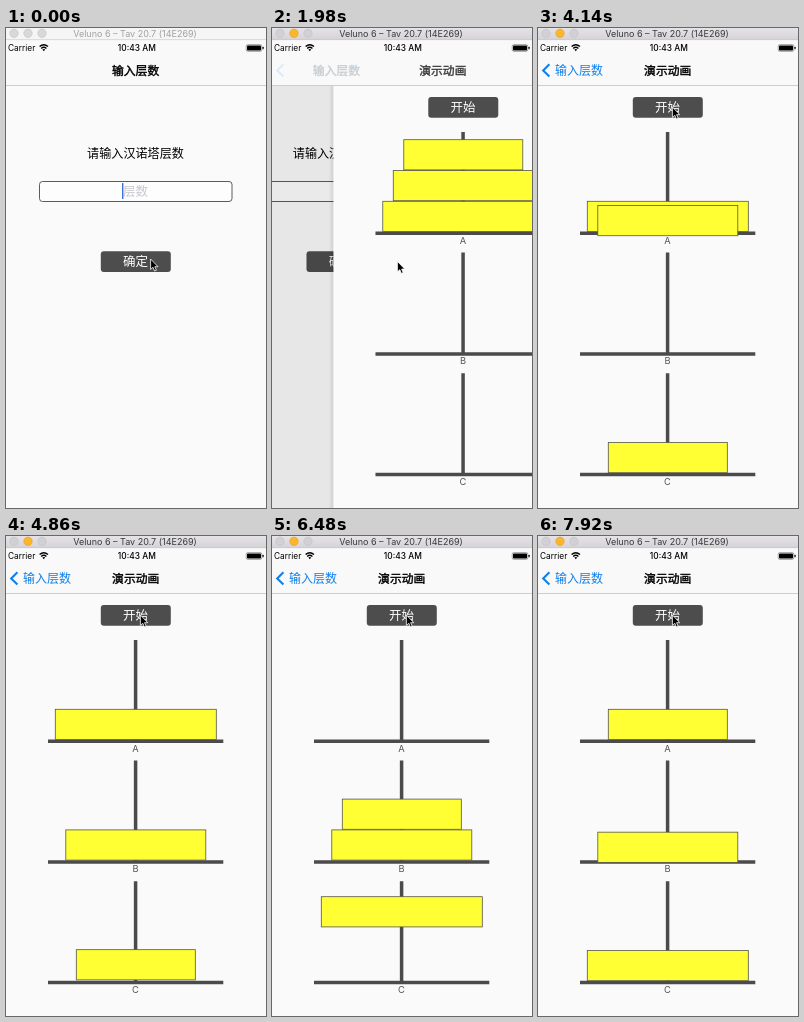
Animation, 260 px wide and 480 px high, one loop 8 s. Source, as an HTML page:

```html
<!DOCTYPE html>
<html lang="zh">
<head>
<meta charset="utf-8">
<style>
html, body { margin: 0; width: 100%; height: 100%; overflow: hidden; background: #fafafa; }
svg { display: block; width: 100vw; height: 100vh; }
text { font-family: Inter, "Noto Sans CJK SC", "Noto Sans CJK", sans-serif; }
.mid { text-anchor: middle; }
.button rect { fill: #4d4d4d; }
.button text { fill: #fff; font-size: 12.5px; }
.nav { font-size: 11.8px; stroke: #000; stroke-width: .4; }
.back { font-size: 12px; fill: #0f7fea; }
.peg { stroke: #4b4b4b; stroke-width: 3.5; fill: none; }
.label { font-size: 9.3px; fill: #555; }
.disk { fill: #ffff33; stroke: #55554c; stroke-width: .8; }
</style>
</head>
<body>
<svg viewBox="0 0 260 480">
  <defs>
    <linearGradient id="edge">
      <stop offset="0" stop-opacity="0"/>
      <stop offset="1" stop-opacity=".1"/>
    </linearGradient>
    <linearGradient id="chrome" x2="0" y2="1">
      <stop offset="0" stop-color="#e6e3e8"/>
      <stop offset="1" stop-color="#d5d2d8"/>
    </linearGradient>
  </defs>

  <g id="form">
    <rect width="260" height="480" fill="#fafafa"/>
    <text class="mid" x="129.5" y="129.5" font-size="12.1">请输入汉诺塔层数</text>
    <rect x="33.5" y="153.5" width="192.5" height="20" rx="3" fill="#fdfdfd" stroke="#4a4a4a" stroke-width=".9"/>
    <text id="hint" class="mid" x="129.5" y="167.8" font-size="12.5" fill="#c7c7cd">层数</text>
    <text id="typed" class="mid" x="129.5" y="167.8" font-size="12.5">3</text>
    <rect id="caret" y="155" width="1.4" height="16" fill="#3f6fd8"/>
    <g class="button">
      <rect x="94.8" y="223.2" width="70" height="20.8" rx="3"/>
      <text class="mid" x="129.5" y="238.3">确定</text>
    </g>
  </g>
  <rect id="dim" width="260" height="480"/>

  <g id="demo">
    <rect x="-5" width="5" height="480" fill="url(#edge)"/>
    <rect width="260" height="480" fill="#fafafa"/>
    <g class="button">
      <rect x="94.8" y="69" width="70" height="20.8" rx="3"/>
      <text class="mid" x="129.5" y="84">开始</text>
    </g>
    <g id="pegs"></g>
    <g id="disks"></g>
  </g>

  <rect y="12" width="260" height="46" fill="#f9f9f9"/>
  <rect y="57.2" width="260" height=".7" fill="#bcbcbc"/>
  <text x="2" y="23.2" font-size="8.35">Carrier</text>
  <g fill="none" stroke="#000" stroke-width="1.4">
    <path d="M33.6 18.6Q37.8 14.7 42 18.6M35.2 20.5Q37.8 18.2 40.4 20.5"/>
    <path d="M36.4 21.6L37.8 23.2L39.2 21.6Q37.8 20.6 36.4 21.6Z" fill="#000" stroke="none"/>
  </g>
  <text class="mid" x="130.8" y="23.2" font-size="8.4" font-weight="500">10:43 AM</text>
  <rect x="240.2" y="16.6" width="15.6" height="6.8" rx="1.6" fill="none" stroke="#555" stroke-width=".5"/>
  <rect x="241" y="17.4" width="14" height="5.2" rx=".8"/>
  <rect x="256.5" y="18.8" width="1.1" height="2.4" rx=".5"/>

  <path id="chevron" d="M11.4 36.2L5.2 42.4L11.4 48.6" fill="none" stroke="#0f7fea" stroke-width="2.1"/>
  <text id="oldTitle" class="nav" y="46.6">输入层数</text>
  <text id="back" class="back" y="46.7">输入层数</text>
  <text id="newTitle" class="nav mid" y="46.6">演示动画</text>

  <rect id="bar" width="260" height="12"/>
  <rect y="11.5" width="260" height=".6" fill="#c4c4c4"/>
  <g id="lights" stroke-width=".6"></g>
  <text id="caption" class="mid" x="129" y="9" font-size="9">Veluno 6 – Tav 20.7 (14E269)</text>

  <path id="mouse" d="M0 0V10.4L2.4 8.3L4 12L5.8 11.2L4.2 7.7H7.4Z" stroke="#fff" stroke-width=".8"/>
</svg>
<script>
const LOOP = 8000, TICK = 180;
const ACTIVE = 540, TYPED = 1080;
const PUSH = 1831, PUSH_TIME = 350;
const FIRST_MOVE = 2807, MOVE_TIME = 1000;

const $ = id => document.getElementById(id);
const clamp = v => Math.min(1, Math.max(0, v));
const mix = (a, b, k) => a + (b - a) * k;

function add(parent, tag, attrs) {
  const el = document.createElementNS("http://www.w3.org/2000/svg", tag);
  for (const k in attrs) el.setAttribute(k, attrs[k]);
  return parent.appendChild(el);
}
function set(id, attrs) {
  for (const k in attrs) $(id).setAttribute(k, attrs[k]);
}

// cubic-bezier(.42, 0, .58, 1)
function easeInOut(x) {
  let lo = 0, hi = 1, s = .5;
  for (let i = 0; i < 24; i++) {
    s = (lo + hi) / 2;
    const at = 3 * (1 - s) ** 2 * s * .42 + 3 * (1 - s) * s * s * .58 + s ** 3;
    if (at < x) lo = s; else hi = s;
  }
  return s * s * (3 - 2 * s);
}

const PEG_GAP = 120.6;
["A", "B", "C"].forEach((name, i) => {
  const y = i * PEG_GAP;
  add($("pegs"), "path", { class: "peg", d: `M129.6 ${104 + y}V${205 + y}M42 ${205.3 + y}H217.3` });
  add($("pegs"), "text", { class: "label mid", x: 129.5, y: 215.8 + y }).textContent = name;
});

// Disks from large to small; each move is [disk, peg, level].
const disks = [161, 140, 119].map(width =>
  add($("disks"), "rect", { class: "disk", x: 129.8 - width / 2, width, height: 30.2 }));
const MOVES = [[2, 2, 0], [1, 1, 0], [2, 1, 1], [0, 2, 0], [2, 0, 0], [1, 2, 1]];
const diskY = (peg, level) => 173.3 + peg * PEG_GAP - level * 30.8;

const lights = [8, 22, 36].map(cx => add($("lights"), "circle", { cx, cy: 5.3, r: 4.2 }));

const MOUSE = [[0, 144.6, 231], [1620, 144.6, 231], [1980, 125.4, 233.4], [2160, 126, 231], [2610, 134.4, 79], [LOOP, 134.4, 79]];

function mouseAt(t) {
  const i = MOUSE.findIndex(p => p[0] > t);
  const [t0, x0, y0] = MOUSE[i - 1], [t1, x1, y1] = MOUSE[i];
  const k = easeInOut((t - t0) / (t1 - t0));
  return [mix(x0, x1, k), mix(y0, y1, k)];
}

function drawWindow(t) {
  const on = t >= ACTIVE;
  set("bar", { fill: on ? "url(#chrome)" : "#f5f5f5" });
  set("caption", { fill: on ? "#383838" : "#a0a0a0" });
  lights.forEach((el, i) => {
    const lit = on && i === 1;
    el.setAttribute("fill", lit ? "#fdb62c" : on ? "#d2d0d4" : "#d8d8d8");
    el.setAttribute("stroke", lit ? "#e09f20" : "#c2c2c2");
  });
}

function drawForm(t) {
  const typed = t >= TYPED;
  set("hint", { opacity: typed ? 0 : 1 });
  set("typed", { opacity: typed ? 1 : 0 });
  set("caret", { x: typed ? 134 : 116, opacity: t % 1080 < 540 ? 1 : 0 });
}

function drawPush(t) {
  const rest = (1 - clamp((t - PUSH) / PUSH_TIME)) ** 2.6;
  const p = 1 - rest;
  set("form", { transform: `translate(${-79 * p})` });
  set("dim", { opacity: .1 * p });
  set("demo", { transform: `translate(${260 * rest})`, visibility: p ? "visible" : "hidden" });
  const x = mix(106, 17, p ** 1.15);
  set("oldTitle", { x, opacity: p ? .65 * rest : 1 });
  set("back", { x, opacity: p ** 10 });
  set("chevron", { opacity: p ** 8 });
  set("newTitle", { x: 129.7 + 174 * rest, opacity: p });
}

function drawDisks(t) {
  const ys = disks.map((_, i) => diskY(0, i));
  MOVES.forEach(([disk, peg, level], i) => {
    const k = clamp((t - FIRST_MOVE) / MOVE_TIME - i);
    if (k > 0) ys[disk] = mix(ys[disk], diskY(peg, level), easeInOut(k));
  });
  disks.forEach((el, i) => el.setAttribute("y", ys[i]));
}

function draw(now) {
  // The screen refreshes in fixed steps.
  const t = Math.floor(now % LOOP / TICK) * TICK;
  drawWindow(t);
  drawForm(t);
  drawPush(t);
  drawDisks(t);
  set("mouse", { transform: `translate(${mouseAt(t)})` });
}

let start;
function frame(now) {
  start ??= now;
  draw(now - start);
  requestAnimationFrame(frame);
}
draw(0);
requestAnimationFrame(frame);
</script>
</body>
</html>
```
